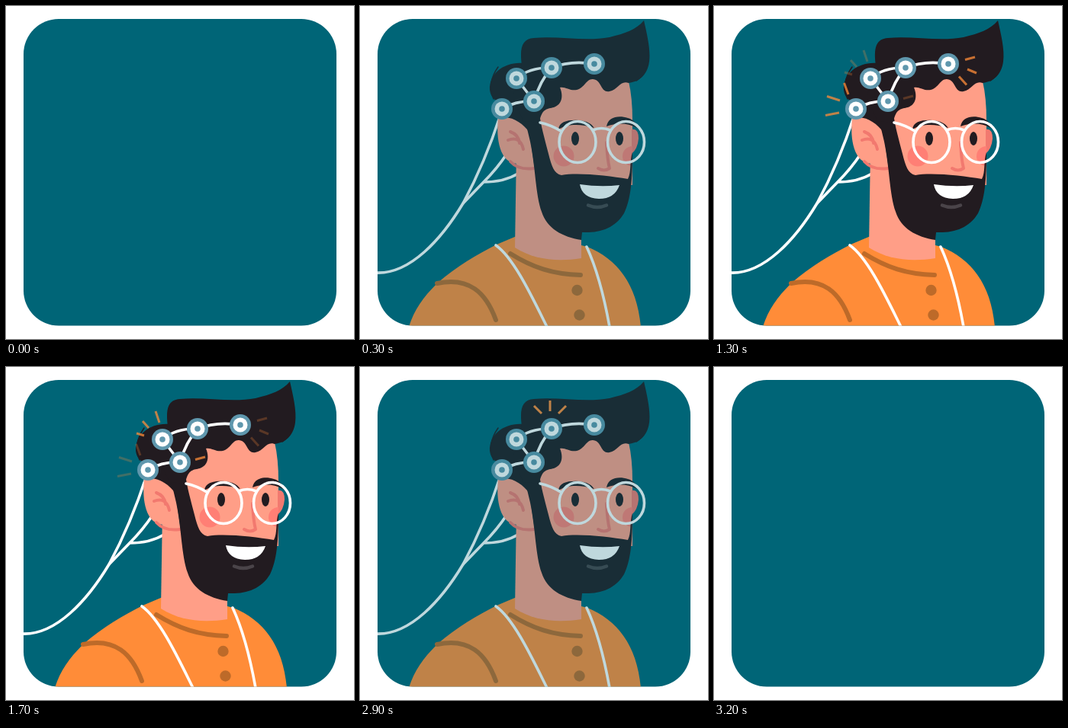
Write an HTML page that moves like this. It is 456 px wide and 437 px high and loops after 3.3 s.

```html
<!DOCTYPE html>
<html lang="en">
<head>
<meta charset="utf-8">
<title>Portrait with electrodes</title>
<style>
html, body { margin: 0; width: 100%; height: 100%; overflow: hidden; background: #fff; }
svg { display: block; width: 456px; height: 437px; }
.line { fill: none; stroke-linecap: round; stroke-linejoin: round; }
.white { stroke: #fff; stroke-width: 3.6; }
.fold { stroke: #bd6a29; stroke-width: 6; }
.blush { stroke: #f2796f; stroke-width: 4; }
.spark { stroke: #ff8c38; stroke-width: 3; fill: none; }
</style>
</head>
<body>
<svg viewBox="0 0 456 437">
  <defs>
    <clipPath id="card"><rect x="23" y="17" width="410" height="402.5" rx="46"/></clipPath>
    <clipPath id="face"><path d="M230 90H345Q357 105 357 140V235H230Z"/></clipPath>
  </defs>
  <rect x="23" y="17" width="410" height="402.5" rx="46" fill="#006577"/>
  <g id="scene" clip-path="url(#card)" opacity="0">
    <!-- cable -->
    <g class="line white">
      <path d="M20 350C66 353 108 304 135 259C155 222 172 180 184 143"/>
      <path d="M135 259L162 231Q180 213 193 193M162 231Q189 231 207 220"/>
    </g>

    <!-- shirt -->
    <path fill="#ff8c38" d="M64 421C71 399 82 383 101 364C127 341 154 326 179 313L205 302H290V314L298 316C337 332 363 365 368 421Z"/>
    <g class="line fold">
      <path d="M197 325C226 343 252 352 289 353" />
      <path d="M101 364C143 355 165 376 178 412"/>
    </g>
    <g fill="#bd6a29"><circle cx="284.500" cy="373" r="7.200"/><circle cx="287.500" cy="405.500" r="7.200"/></g>

    <!-- neck, back hair, ear, face -->
    <path fill="#ff9e87" d="M205 190L203 317C228 333 258 336 290 331V270Z"/>
    <path fill="#221b20" d="M216 75C190 72 169 88 170 110C171 119 176 122 180 126L181 152L222 170L270 130V80Z"/>
    <path class="line" stroke="#221b20" stroke-width="1.500" d="M181 80Q166 101 175 122"/>
    <path fill="#ff9e87" d="M181 148C178 174 183 207 207 207L207 214H229L222 166C213 153 196 142 181 148Z"/>
    <path class="line blush" d="M194 176Q210 170 214 188M197 165Q208 169 209 180"/>
    <path class="line blush" stroke-width="3" d="M197 204Q208 216 228 213"/>
    <path fill="#ff9e87" d="M232 105L330 90L352 99Q357 120 357 150V235H245L232 170Z"/>
    <path fill="#f2796f" d="M356 162Q365 160 365 174Q364 187 356 194Z"/>
    <g clip-path="url(#face)" fill="#ff7f75">
      <circle cx="267" cy="197" r="13.500"/><circle cx="357" cy="197" r="13"/>
    </g>

    <!-- beard and hair -->
    <path fill="#221b20" d="M214 140H235C237 158 242 174 247 194C251 210 254 220 264 222C286 218 326 223 351 227C356 218 353 203 357 192C357 229 355 253 346 272C334 292 314 298 291 297L290 307C265 303 245 292 238 270C230 248 230 211 223 178Z"/>
    <path fill="#221b20" d="M212 78C209 55 212 43 228 42C260 39 296 47 327 41C347 36 362 31 372 19C376 37 381 57 379 73C377 88 368 99 352 101C341 97 338 110 327 112C316 114 317 101 309 97C297 92 296 107 284 110C276 112 268 105 262 107C266 116 266 129 254 133C246 135 238 134 235 153L214 151L200 120Z"/>
    <path class="line" stroke="#221b20" stroke-width="1.500" d="M376 53Q383 85 362 98"/>

    <!-- features -->
    <g fill="#221b20">
      <path d="M260 162C261 151 274 149 287 150C297 151 303 154 307 160C290 155 273 154 260 162Z"/>
      <path d="M323 158C325 146 338 143 351 147C358 149 362 153 363 160C350 153 336 153 323 158Z"/>
      <ellipse cx="282" cy="174" rx="5" ry="9"/><ellipse cx="340" cy="174" rx="5" ry="9"/>
    </g>
    <path class="line blush" d="M323 179Q324 201 327 213Q320 218 312 213"/>
    <path fill="#fff" d="M288 234Q315 238 340 235Q334 253 313 253Q291 252 288 234Z"/>
    <path class="line" stroke="#4a4449" stroke-width="4.500" d="M299 261.500Q311 266.500 323 261.500"/>
    <g class="line white">
      <ellipse cx="285" cy="178.500" rx="24" ry="27"/><ellipse cx="348.500" cy="178.500" rx="24" ry="27"/>
      <path d="M305 163Q316 158 328 163M236 153Q250 156 263 164"/>
      <path d="M178 314C202 331 226 383 245 421M297 316C310 344 320 382 327 421"/>
      <path d="M186 135Q205 124 228 125L205 95Q223 80 251 81Q276 71 307 76M251 81Q236 98 228 125"/>
    </g>
    <g id="nodes"></g>
    <path class="spark" d="M148 118.500L165 124M146 143.500L164 140M170.500 101L176 116M329 70.500L342 67M332 83L344 88M321 92.500L331 103.500"/>
    <path class="spark" d="M179 71L187 80M196 58L201 73M171 87L181 90M248 121.500L261 118"/>
    <path class="spark" d="M228 51L238 61M249 44V58M270 51L260 61"/>
  </g>
</svg>
<script>
const LOOP = 3300;
const scene = document.getElementById('scene');
const sparks = document.querySelectorAll('.spark');
const clamp = v => Math.max(0, Math.min(1, v));

document.getElementById('nodes').innerHTML =
  [[205, 95], [251, 81], [307, 76], [228, 125], [186, 135]].map(([x, y]) =>
    [[14, '#5f97ad'], [9.5, '#fff'], [3.8, '#5f97ad']].map(([r, fill]) =>
      `<circle cx="${x}" cy="${y}" r="${r}" fill="${fill}"/>`).join('')).join('');

// The picture holds for 100 ms during fades and 200 ms in between.
const hold = t => t < 500 || t >= 2900
  ? Math.floor(t / 100) * 100
  : 500 + Math.floor((t - 500) / 200) * 200;

function draw(now) {
  const t = hold(now % LOOP);
  scene.setAttribute('opacity', clamp(Math.min(t / 400, (3200 - t) / 400)));
  sparks.forEach((spark, i) => {
    const peak = 1100 + i * 800;
    const away = i === 2 && t > peak ? 0 : Math.abs(t - peak);
    spark.setAttribute('opacity', t < 500 ? 0 : clamp(1 - away / 800));
  });
}

const start = performance.now();
function tick() {
  draw(performance.now() - start);
  requestAnimationFrame(tick);
}
tick();
</script>
</body>
</html>
```
